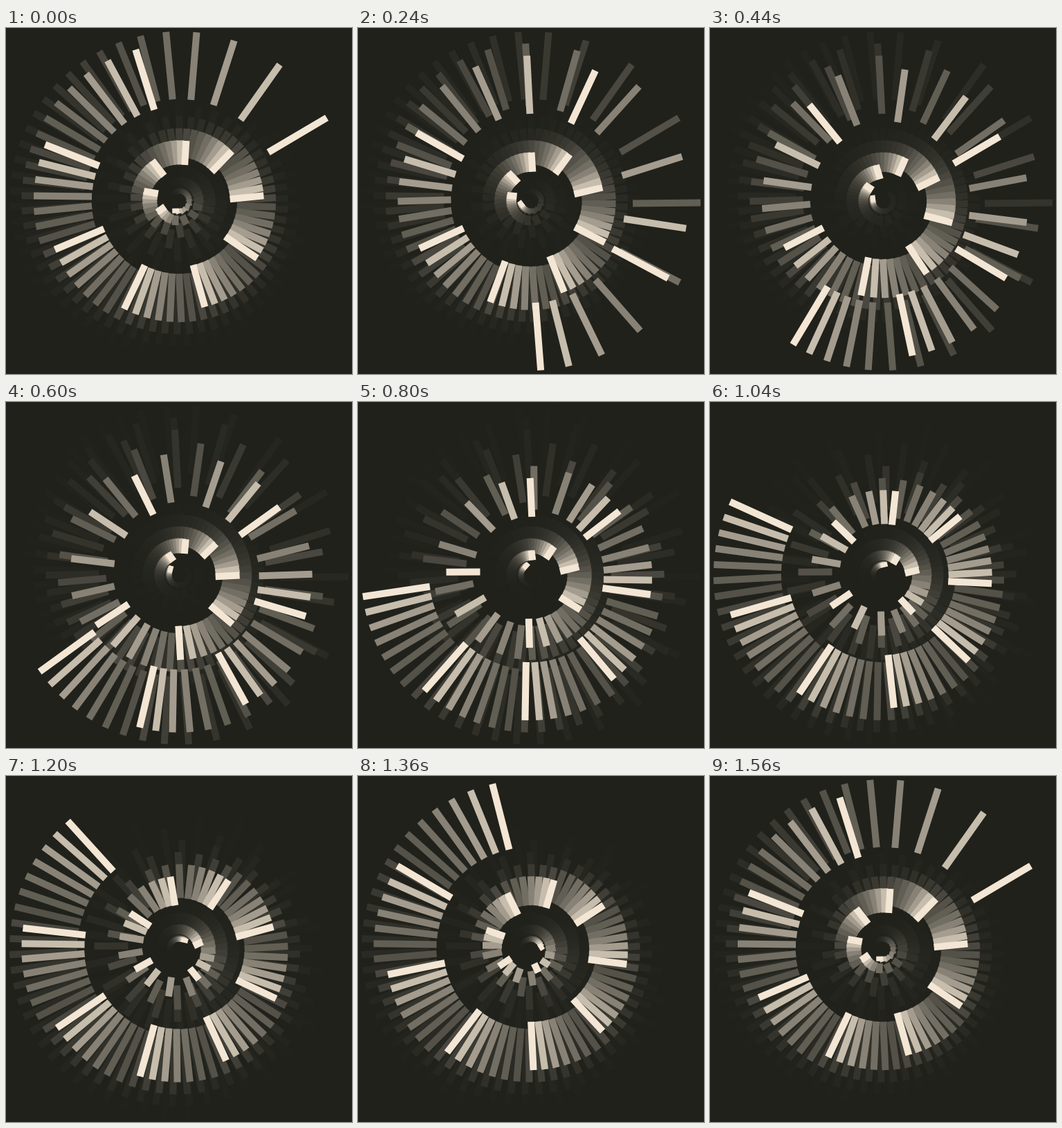
Animation, 500 px wide and 500 px high, one loop 1600 ms. Source, as an HTML page with a canvas:

```html
<!DOCTYPE html>
<html lang="en">
<head>
<meta charset="utf-8">
<title>Radial spiral</title>
<style>
  html, body { margin: 0; width: 100%; height: 100%; overflow: hidden; background: #20211b; }
  canvas { display: block; width: 100vw; height: 100vh; }
</style>
</head>
<body>
<canvas id="stage" width="500" height="500"></canvas>
<script>
const ctx = document.getElementById('stage').getContext('2d');
const TAU = Math.PI * 2, RAD = Math.PI / 180;
const STEP_MS = 40, STEPS = 40, PERIOD = 39;
const RINGS = 14, RING_GAP = 17.5, BAR = 10;
const TRAIL = 24, FADE = 0.79;
const ECC = 0.7;                      // uneven spin: a circle seen off-centre
const PEAK = 0.795, TURN = -6.9;      // step and angle of the fastest moment
const LAG = 2.727, TWIST = 25.28;     // delay (steps) and angle between rings
const BACK = [32, 33, 27], HEAD = [243, 230, 212];

const mix = k => `rgb(${BACK.map((b, i) => Math.round(b + (HEAD[i] - b) * k))})`;
const shades = Array.from({ length: TRAIL + 1 }, (_, age) => mix(FADE ** age));

function angle(ring, step) {
  const lag = RINGS - ring;
  const phase = (step - lag * LAG - PEAK) / PERIOD * TAU;
  const spin = Math.atan2(Math.sin(phase), Math.cos(phase) - ECC);
  return spin + (TURN - lag * TWIST) * RAD;
}

function bar(ring, step) {
  const outer = ring * RING_GAP;
  ctx.save();
  ctx.rotate(angle(ring, step));
  ctx.fillRect(outer * 0.6, 0, outer * 0.4, BAR);
  ctx.restore();
}

function draw(step) {
  ctx.setTransform(1, 0, 0, 1, 0, 0);
  ctx.fillStyle = mix(0);
  ctx.fillRect(0, 0, 500, 500);
  ctx.translate(250, 250);
  for (let age = TRAIL; age >= 0; age--) {
    ctx.fillStyle = shades[age];
    for (let ring = RINGS; ring > 0; ring--) bar(ring, step - age);
  }
}

const start = performance.now();
let shown = -1;

function tick() {
  const step = Math.floor((performance.now() - start) / STEP_MS) % STEPS;
  if (step !== shown) draw(shown = step);
  requestAnimationFrame(tick);
}
tick();
</script>
</body>
</html>
```
